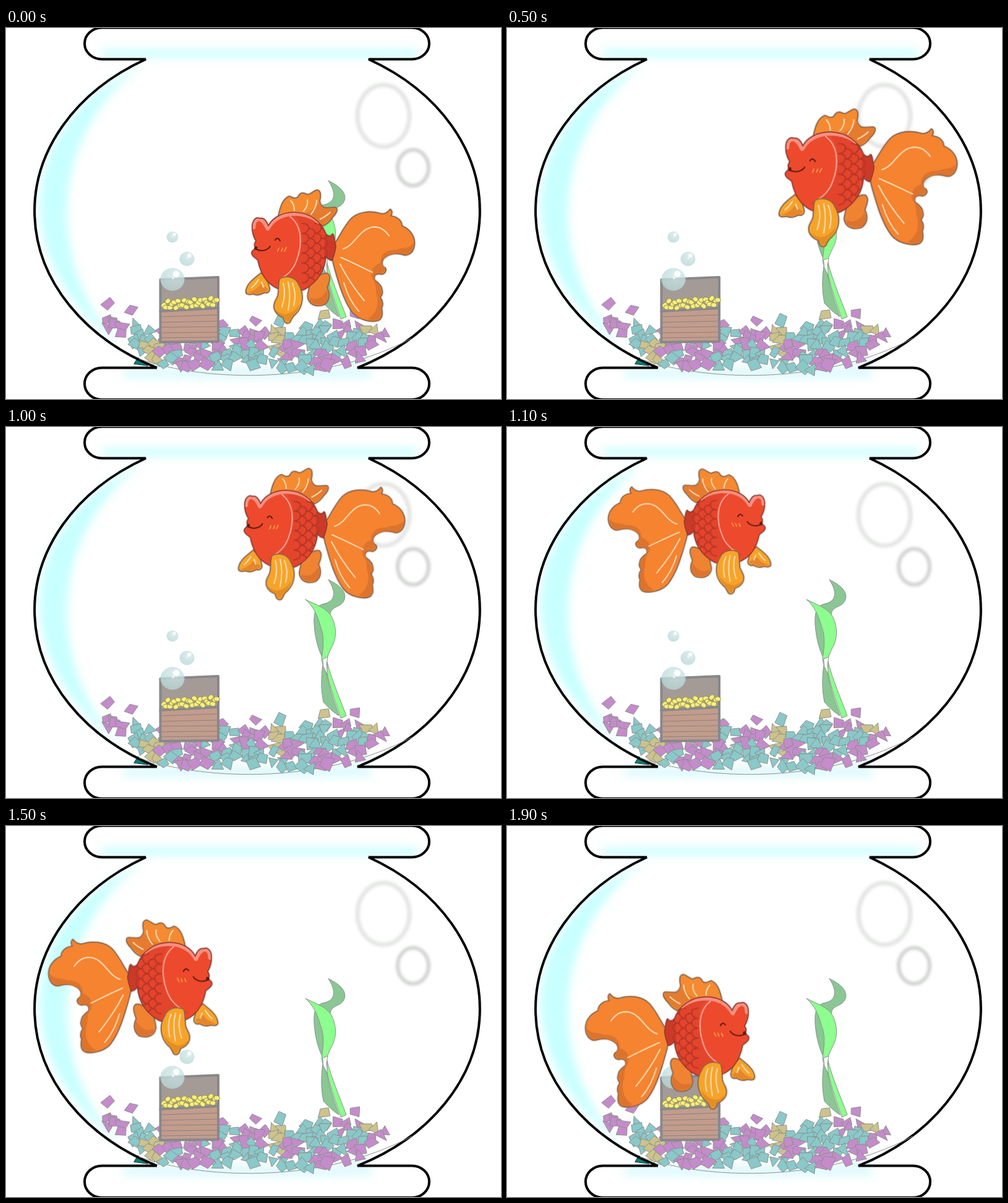
These frames come from a looping animation (800x600 px, 2 s). An HTML page:

```html
<!DOCTYPE html>
<html lang="en">
<head>
<meta charset="utf-8">
<title>Goldfish bowl</title>
<style>
html, body { margin: 0; width: 100%; height: 100%; overflow: hidden; background: #fefffe; }
svg { display: block; width: 100%; height: 100%; }
path, line { stroke-linecap: round; stroke-linejoin: round; }
.line { fill: none; }
.outline { fill: none; stroke: #000; stroke-width: 4; stroke-linejoin: miter; stroke-linecap: butt; }
.thin { stroke: #8b908c; stroke-width: 1; }
.fin { stroke: #8d6248; stroke-width: 1.6; }
.shine { fill: none; stroke: #fbdcb4; stroke-width: 2; }
.shade { fill: #dd742d; }
.halo { filter: drop-shadow(0 0 1px #888); }

/* Translation places the nose side of the fish; the negative scale turns it around. */
#fish { transform-origin: 0 0; animation: swim 2s step-end infinite; }
@keyframes swim {
  0%   { transform: translate(387px, 261px) scale(1, 1); animation-timing-function: steps(3, end); }
  15%  { transform: translate(444px, 182px) scale(1.025, 1.04); }
  20%  { transform: translate(452px, 156px) scale(1.04, 1.035); }
  25%  { transform: translate(439px, 130px) scale(1.055, 1.032); }
  30%  { transform: translate(441px, 126px) scale(.99, .99); animation-timing-function: steps(4, end); }
  50%  { transform: translate(375px, 66px) scale(.986, .985); }
  55%  { transform: translate(427px, 67px) scale(-.963, .937); }
  60%  { transform: translate(405px, 83px) scale(-.963, .94); animation-timing-function: steps(3, end); }
  75%  { transform: translate(343px, 151px) scale(-1.003, 1.01); }
  80%  { transform: translate(347px, 177px) scale(-1.003, 1.01); }
  85%  { transform: translate(356px, 202px) scale(-1.003, 1.01); }
  90%  { transform: translate(373px, 225px) scale(-1.003, 1.01); }
  95%, 100% { transform: translate(401px, 239px) scale(-1.003, 1.01); }
}
</style>
</head>
<body>
<svg viewBox="0 0 800 600">
  <defs>
    <filter id="soft" x="-20%" y="-150%" width="140%" height="400%"><feGaussianBlur stdDeviation="7"/></filter>
    <filter id="haze" x="-20%" y="-20%" width="140%" height="140%"><feGaussianBlur stdDeviation="2"/></filter>
    <radialGradient id="bubble" cx=".6" cy=".3" r=".75">
      <stop offset="0" stop-color="#d3e8e8"/><stop offset="1" stop-color="#b5d6d6"/>
    </radialGradient>
    <path id="body" d="M410 308C417 306 421 312 424 320C430 308 445 298 465 298C492 298 510 314 517 333Q523 340 528 333C532 338 530 344 533 352C533 360 530 368 527 376Q521 375 517 369C515 396 500 413 482 423C460 431 436 425 421 408C413 398 409 385 407 375C400 370 395 366 398 361C402 358 402 357 403 355C399 350 404 346 404 344C398 335 396 320 400 312C403 307 407 306 410 308Z"/>
    <clipPath id="bodyClip"><use href="#body"/></clipPath>
  </defs>

  <!-- glass -->
  <g filter="url(#soft)">
    <path fill="#c8ffff" d="M222 58C20 150-10 370 190 520C68 400 58 180 222 58Z"/>
    <rect x="155" y="34" width="510" height="14" fill="#d0ffff"/>
    <rect x="190" y="552" width="400" height="14" fill="#dcfaff"/>
    <path fill="#e2f6f8" d="M225 540Q410 582 590 530V548H235Z"/>
  </g>
  <g class="line" filter="url(#haze)">
    <ellipse cx="610" cy="142" rx="42" ry="50" stroke="#e4e6e4" stroke-width="7"/>
    <ellipse cx="658" cy="226" rx="25" ry="29" stroke="#d0d2d0" stroke-width="6"/>
  </g>
  <path fill="#0b7f77" stroke="#033" d="M207 543L213 533L229 546Z"/>
  <path class="outline" d="M244 549.5H155A28 25.75 0 0 0 155 601H656A28 25.75 0 0 0 656 549.5H568A361 284 0 0 0 586 50.5H656A28 25.5 0 0 0 656-.5H155A28 25.5 0 0 0 155 50.5H226A361 284 0 0 0 244 549.5"/>
  <path class="line thin" d="M215 535C330 575 520 575 655 502"/>

  <g id="gravel" class="thin"></g>

  <!-- plant -->
  <g class="thin" stroke-width=".8">
    <path fill="#8ac794" d="M521 247C545 258 550 270 547 279C542 293 527 288 524 302C530 330 524 352 516 378L512 375C505 360 500 345 498 320C497 300 500 289 513 286C530 283 536 270 521 247Z"/>
    <path fill="#8cff8e" d="M484 279C500 287 520 293 527 308C536 328 533 345 526 357C519 372 516 380 515 390C511 382 509 378 511 368C514 345 513 335 508 322C504 306 497 290 484 279Z"/>
    <path fill="#8ac794" d="M512 385C509 405 509 425 513 445C522 455 530 462 538 467C533 450 524 430 518 398L515 385Z"/>
    <path fill="#fff" d="M512 375L520 372L518 384L521 404L513 388Z"/>
    <path fill="#8cff8e" d="M519 380C525 405 540 440 550 467L541 471C535 450 524 425 519 398Z"/>
  </g>

  <!-- chest -->
  <g stroke="#88888b" stroke-width="4" stroke-linejoin="miter">
    <path fill="#a49b96" d="M249.500 407L343 403V453L249.500 459Z"/>
    <path fill="#c29c8c" d="M249.500 458L343 453V507L249.500 508Z"/>
  </g>
  <path class="line" stroke="#8d817d" d="M252 467L341 464M252 476L341 474M252 484L341 483M252 493L341 492M252 501L341 500"/>
  <g id="coins" fill="#f7ef7d" stroke="#9c954e" stroke-width="1"></g>
  <g id="bubbles"></g>

  <g id="fish"><g class="halo" transform="translate(-387 -261)">
    <!-- rear fins -->
    <path class="fin" fill="#f08332" d="M490 420C495 405 512 395 520 397C526 402 522 412 519 420C524 430 523 441 515 447C504 452 492 448 489 440C486 435 488 430 490 420Z"/>
    <path class="shade" d="M491 436Q506 444 519 424Q523 440 514 446Q499 450 491 441Z"/>
    <path class="fin" fill="#f58330" d="M529 352C538 340 545 322 558 308C570 297 590 295 605 300C612 302 617 298 621 293C625 296 624 301 622 304C633 305 640 312 640 320C655 326 662 340 660 352C658 364 650 369 643 367C630 363 620 366 614 370C606 375 606 385 613 388C616 392 612 399 606 398C596 396 594 402 596 408C602 412 608 418 608 425C610 430 606 433 605 436C609 441 610 448 607 453C609 462 608 470 602 473C590 477 570 472 560 460C545 440 537 410 530 385C527 375 528 372 529 365Z"/>
    <path class="shade" d="M659 348C650 358 640 354 630 359C612 359 606 366 605 380C594 384 588 392 592 405C600 415 596 424 600 435C602 450 598 462 584 471Q596 475 603 472Q609 464 606 453Q610 446 604 436Q612 424 596 408Q592 396 606 397Q616 393 611 387Q602 376 616 369Q630 362 643 366Q657 368 659 348Z"/>
    <path class="shine" stroke-width="3" d="M545 357C562 353 570 328 588 323C602 319 612 326 619 336"/>
    <path class="shine" d="M541 371C558 378 577 388 592 395M540 382C551 404 565 424 579 441M546 412C553 436 562 449 570 458"/>
    <!-- dorsal fin -->
    <path class="fin" fill="#f58a30" d="M440 305C443 290 447 276 458 272C464 275 468 277 472 273C474 268 478 265 484 268C490 272 494 265 502 262C508 262 509 268 508 275C506 280 507 285 513 290C518 292 525 290 532 290C538 292 534 300 528 306C524 312 518 318 512 320C490 300 460 297 440 305Z"/>
    <path class="shade" d="M478 300Q494 299 507 282L512 291Q520 293 533 291Q535 298 526 307L512 319Q498 303 478 300Z" opacity=".65"/>
    <path class="shine" d="M466 295Q466 285 460 279M481 296Q489 287 487 278M493 301Q502 290 502 279M508 309Q518 304 524 298"/>
    <!-- left fin -->
    <path class="fin" fill="#f5a32a" d="M412 396C403 404 390 412 388 424C386 431 393 432 399 430C405 433 412 431 417 428C425 430 428 424 425 417C424 410 420 404 412 396Z"/>
    <path class="shade" d="M390 428Q406 424 411 414L424 422Q422 428 416 427Q405 433 398 429Z" opacity=".6"/>
    <path class="shine" d="M408 407Q403 415 397 420M413 411L416 419"/>
    <!-- body -->
    <use href="#body" fill="#ed492d"/>
    <g clip-path="url(#bodyClip)">
      <path fill="#e2452c" d="M462 298C482 318 482 350 470 375C463 392 450 406 435 409L460 435L540 420V300Z"/>
      <path fill="#cb3a29" d="M517 325Q513 353 515 378H540V325Z"/>
      <g id="scales" class="line" stroke="#b93527" stroke-width="2"></g>
      <path class="line" stroke="#f98f80" stroke-width="7" d="M400 322Q400 308 410 309Q417 311 423 324Q434 303 463 300Q490 300 505 313"/>
    </g>
    <use href="#body" fill="none" stroke="#913a30" stroke-width="1.600"/>
    <path class="line" stroke="#f7a79a" stroke-width="2" d="M459 305C479 320 479 350 470 375C465 390 454 401 444 405"/>
    <!-- face -->
    <path class="line" stroke="#5a1b16" stroke-width="2" d="M435 343Q439 337 443 344M403 357C410 362 422 361 427 353"/>
    <ellipse cx="404" cy="356" rx="2.500" ry="3" fill="#5a1b16"/>
    <path class="line" stroke="#f7a13a" stroke-width="1.700" d="M441 356L439 361M447 356L445 361M453 355L450 361"/>
    <!-- front fin -->
    <path class="fin" fill="#f6a429" d="M443 405C452 400 468 402 473 415C482 430 481 450 468 463C463 466 462 470 459 476C454 480 449 476 448 468C439 465 433 458 433 450C433 440 440 438 440 428C441 418 440 410 443 405Z"/>
    <path fill="#e58e25" d="M435 455Q447 465 454 462Q465 461 475 446Q470 462 463 465L458 475Q450 476 449 467Q439 465 435 455Z"/>
    <path class="shine" d="M448 413Q453 430 446 451M456 411Q461 431 456 456M463 413Q470 430 465 449"/>
  </g></g>
</svg>
<script>
const add = (parent, tag, attrs) => {
  const node = document.createElementNS(document.querySelector('svg').namespaceURI, tag);
  for (const name in attrs) node.setAttribute(name, attrs[name]);
  document.getElementById(parent).append(node);
};

let seed = 7;
const random = () => (seed = (seed * 16807) % 2147483647) / 2147483647;
const spread = size => (random() - .5) * size;

// Piecewise linear height of the gravel's edges.
const heightAt = (points, x) => {
  const last = points.length - 1;
  const found = points.findIndex(p => p[0] >= x);
  if (found === 0) return points[0][1];
  if (found < 0) return points[last][1];
  const [x0, y0] = points[found - 1], [x1, y1] = points[found];
  return y0 + (y1 - y0) * (x - x0) / (x1 - x0);
};
const upperEdge = [[160, 472], [200, 484], [250, 492], [345, 494], [400, 490], [450, 498], [500, 477], [550, 480], [614, 491]];
const lowerEdge = [[160, 485], [200, 505], [235, 538], [285, 553], [350, 544], [430, 545], [470, 553], [515, 547], [565, 537], [595, 515], [614, 496]];

const patches = {
  '#c58bcb': [[165, 480], [190, 473], [262, 520], [285, 548], [300, 520], [315, 545], [350, 515], [385, 495], [412, 500], [460, 520], [520, 540], [550, 490], [560, 525], [598, 500]],
  '#8ac8c9': [[205, 492], [215, 510], [228, 482], [265, 540], [330, 500], [350, 542], [365, 490], [380, 540], [410, 533], [470, 495], [450, 542], [490, 545], [500, 485], [540, 507], [575, 497]],
  '#cdc28b': [[240, 524], [440, 508], [588, 488]]
};
const colorAt = (x, y) => {
  let best = Infinity, nearest;
  for (const color in patches)
    for (const [px, py] of patches[color]) {
      const distance = Math.hypot(x - px, y - py);
      if (distance < best) { best = distance; nearest = color; }
    }
  return nearest;
};

const shard = (x, y, fill, size = 11) => {
  const turn = random() * 6.28, corners = random() < .25 ? 3 : 4;
  const points = Array.from({ length: corners }, (_, i) => {
    const angle = turn + i * 6.28 / corners + spread(.7), r = size * (.75 + random() * .6);
    return `${(x + r * Math.cos(angle)).toFixed(1)},${(y + r * .9 * Math.sin(angle)).toFixed(1)}`;
  });
  add('gravel', 'polygon', { points: points.join(' '), fill });
};

const [purple, teal, olive] = Object.keys(patches);
[[166, 446, purple], [202, 457, purple], [444, 474, teal], [565, 461, purple], [402, 474, purple],
 [515, 463, olive], [443, 492, olive], [349, 480, purple]].forEach(s => shard(...s));
for (let row = 470; row < 560; row += 11)
  for (let col = 160; col < 616; col += 15) {
    const x = col + spread(12), y = row + spread(9);
    if (y >= heightAt(upperEdge, x) - 4 && y <= heightAt(lowerEdge, x) + 2)
      shard(x, y, colorAt(x + spread(14), y + spread(10)));
  }

for (let i = 0; i < 27; i++) {
  const cx = 255 + i * 3.3, cy = 448 - i * .22 + 6 * Math.sin(i * 2.4);
  add('coins', 'ellipse', { cx, cy, rx: 4.6, ry: 3.6, transform: `rotate(${(i * 47) % 90 - 45} ${cx} ${cy})` });
}

for (const [x, y, r] of [[269, 338, 9.5], [292.5, 373.5, 12], [269, 406.5, 19.5]]) {
  add('bubbles', 'ellipse', { cx: x, cy: y, rx: r, ry: r * .95, fill: 'url(#bubble)', opacity: .78 });
  add('bubbles', 'circle', { cx: x + r * .32, cy: y - r * .45, r: r * .27, fill: '#fff', opacity: .9 });
  add('bubbles', 'circle', { cx: x + r * .05, cy: y - r * .1, r: r * .1, fill: '#fff', opacity: .7 });
}

for (let col = 0; col < 4; col++)
  for (let row = 0; row < 6; row++) {
    const x = 479 + col * 10, y = 316 + row * 16 + (col % 2) * 8;
    add('scales', 'path', { d: `M${x} ${y}q12 1 10 9q-2 7-10 7` });
  }
</script>
</body>
</html>
```
